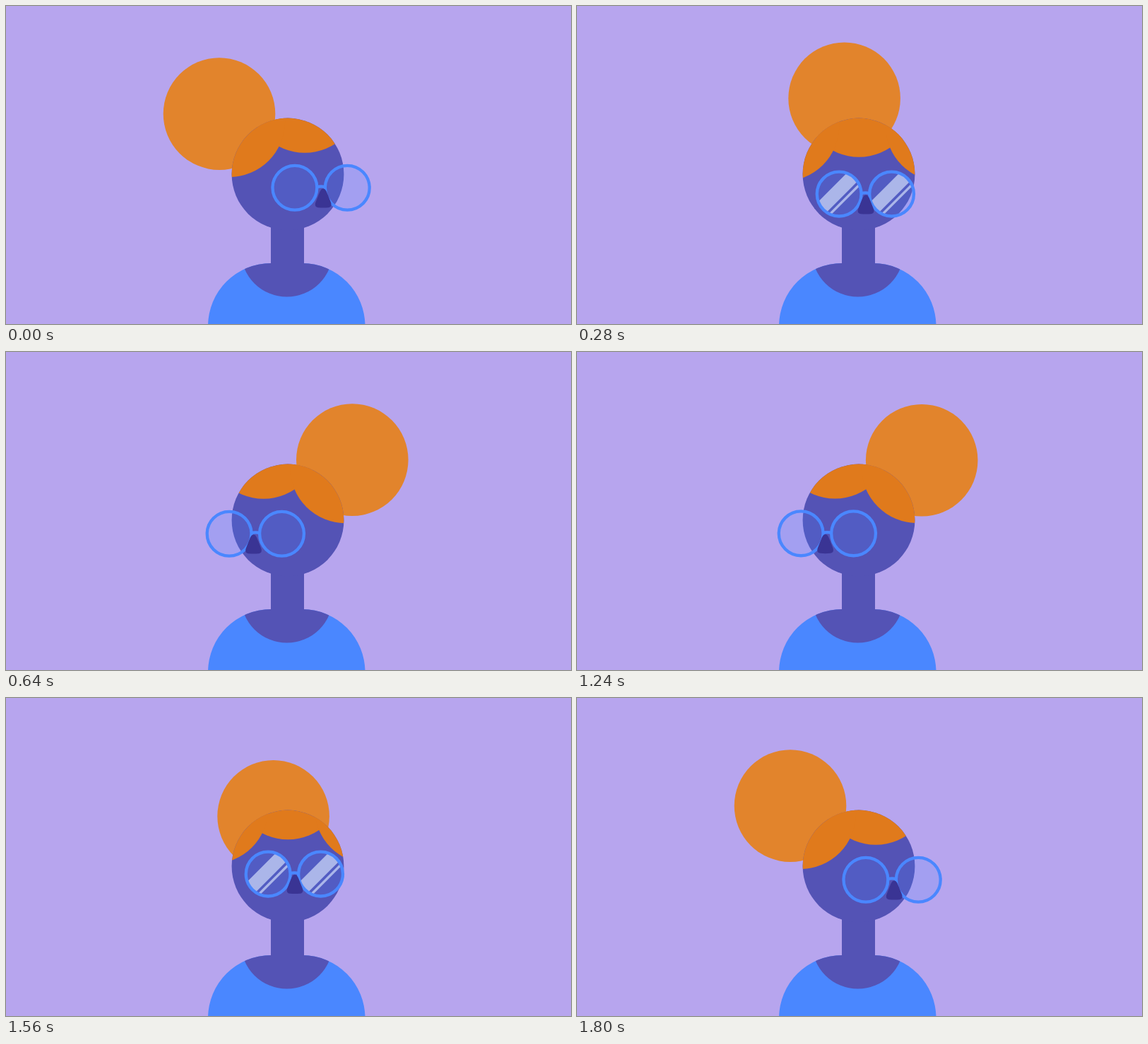
Write an HTML page that moves like this. It is 800 by 450 pixels and loops after 2.36 s.

```html
<!DOCTYPE html>
<html lang="en">
<head>
<meta charset="utf-8">
<title>Head turn</title>
<style>
  html, body { margin: 0; height: 100%; overflow: hidden; background: #b7a5ee; }
  svg { display: block; width: 100%; height: 100%; }
  .skin { fill: #5453b5; }
  .shirt { fill: #4a87ff; }
  .hair { fill: #e07a1c; }
  .bun { fill: #e2842c; }
  .nose { fill: #3a3494; }
  .frame { fill: none; stroke: #4a87ff; stroke-width: 4.3; }
  .lens { fill: #4a87ff; fill-opacity: .19; }
  .glare { fill: #abb6e9; }
</style>
</head>
<body>
<svg viewBox="0 0 800 450">
  <defs>
    <path id="torso" d="M286 453A89 89 0 0 1 375 364H420A89 89 0 0 1 508.500 453Z"/>
    <clipPath id="torsoClip"><use href="#torso"/></clipPath>
    <clipPath id="headClip"><circle cx="399" cy="238" r="79.4"/></clipPath>
    <clipPath id="lensClip"><circle r="30.500"/></clipPath>
    <g id="eyeglass">
      <circle class="lens" r="31.400"/>
      <g class="glare" clip-path="url(#lensClip)">
        <g transform="rotate(45)">
          <rect x="-13.300" y="-40" width="19" height="80"/>
          <rect x="9.300" y="-40" width="3.400" height="80"/>
        </g>
      </g>
      <circle class="frame" r="31.400"/>
    </g>
  </defs>

  <circle id="bun" class="bun" r="79.300"/>

  <use href="#torso" class="shirt"/>
  <circle class="skin" cx="397.700" cy="346.300" r="65.200" clip-path="url(#torsoClip)"/>
  <rect class="skin" x="375" y="300" width="47" height="70"/>
  <circle class="skin" cx="399" cy="238" r="79.400"/>

  <g clip-path="url(#headClip)">
    <g id="hair" class="hair">
      <circle r="79"/>
      <circle cx="-106.900" cy="34.300" r="79"/>
      <circle cx="116.500" cy="34.500" r="79"/>
    </g>
  </g>

  <g id="glasses">
    <use href="#eyeglass" x="-37.200"/>
    <use href="#eyeglass" x="37.200"/>
    <path class="frame" d="M-6.500 -.5Q0 -3 6.500 -.5"/>
  </g>
  <path id="nose" class="nose" d="M0 -27C3.500 -27 5 -22 6.500 -18.500L10.800 -7.500C12.300 -3 10.500 -.6 7 -.3Q0 .5 -7 -.3C-10.500 -.6 -12.300 -3 -10.800 -7.500L-6.500 -18.500C-5 -22 -3.500 -27 0 -27Z"/>
</svg>
<script>
const LOOP = 2360, STEP = 40, TURN = 640, BACK = 1200;

// x at each end, resting y, vertical swing on the way out and back
const parts = [
  { id: 'bun',     from: 302,   to: 490.3, y: 152.6, out: -22.7, back: 15.3 },
  { id: 'hair',    from: 423,   to: 364.6, y: 128.8, out: 6.2,   back: -7.8 },
  { id: 'glasses', from: 446.1, to: 353.3, y: 257.2, out: 9.2,   back: -8.4 },
  { id: 'nose',    from: 449.2, to: 350.5, y: 285.5, out: 9.3,   back: -8.8 }
];
for (const part of parts) part.el = document.getElementById(part.id);
const glare = document.querySelector('.glare');

const clamp = v => Math.min(1, Math.max(0, v));
const ease = u => u * u * (3 - 2 * u);

// the return runs a little faster in its second half
function backTime(t) {
  const s = t - BACK;
  return s <= 360 ? s : 360 + (s - 360) * 1.2;
}

function draw(ms) {
  const t = Math.floor(((ms + 1) % LOOP) / STEP) * STEP;
  const returning = t >= BACK;
  const u = clamp((returning ? backTime(t) : t) / TURN);
  const e = ease(u);
  const p = returning ? 1 - e : e;
  const arc = 4 * e * (1 - e);
  for (const { el, from, to, y, out, back } of parts) {
    const px = from + (to - from) * p;
    const py = y + arc * (returning ? back : out);
    el.setAttribute('transform', `translate(${px.toFixed(2)} ${py.toFixed(2)})`);
  }
  glare.style.opacity = clamp((0.25 - Math.abs(u - 0.5)) / 0.125);
}

function tick() {
  draw(performance.now());
  requestAnimationFrame(tick);
}
tick();
</script>
</body>
</html>
```
